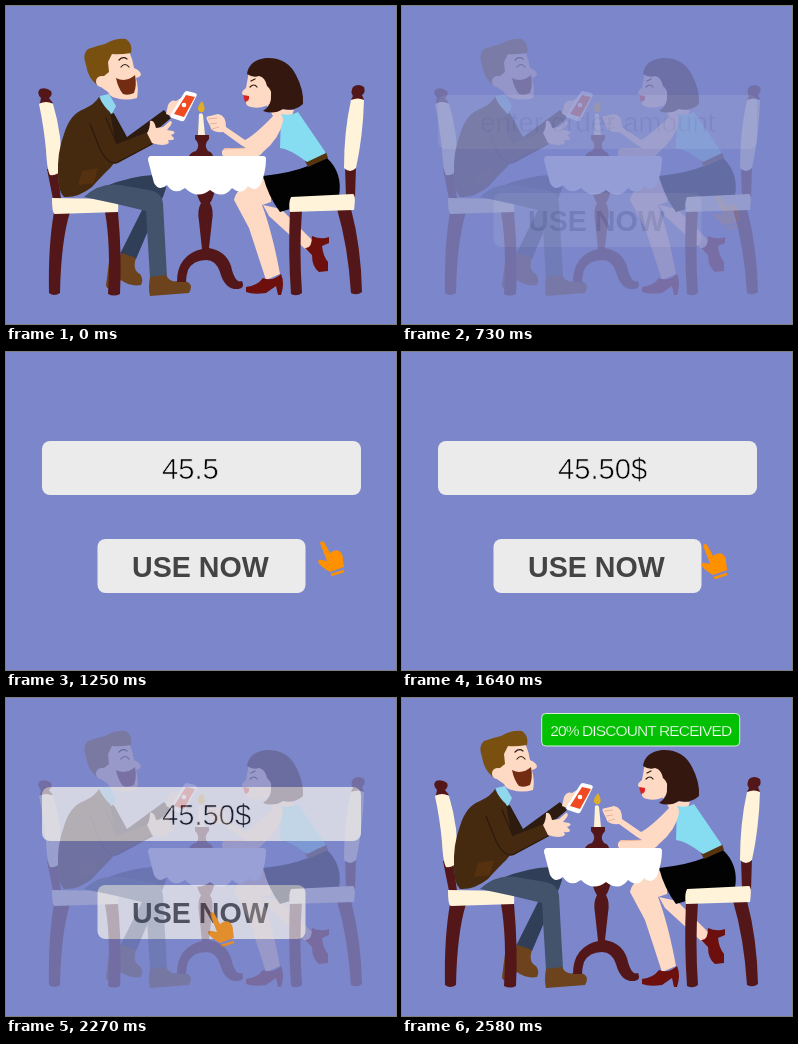
These frames come from a looping animation (390x318 px, 3.38 s). An HTML page:

```html
<!DOCTYPE html>
<html lang="en">
<head>
<meta charset="utf-8">
<title>Dinner discount</title>
<style>
  html, body { margin: 0; height: 100%; overflow: hidden; background: #7b86cb; }
  svg { display: block; }
  text { font-family: "Liberation Sans", Arial, sans-serif; }
  .light { stroke: #ebebeb; stroke-width: .7px; }
  .wood { fill: #531719; }
  .cream { fill: #fff3d9; }
  .skin { fill: #fed9c4; }
  .jacket { fill: #462a10; }
  .dark { fill: #2c1b0e; }
  .shoe { fill: #6c431c; }
  .heel { fill: #6d0f0c; }
  .line { fill: none; stroke: #2c1a0e; stroke-width: 1.2; stroke-linecap: round; }
</style>
</head>
<body>
<svg width="390" height="318" viewBox="0 0 390 318">
  <rect width="390" height="318" fill="#7b86cb"/>

  <g id="form">
    <rect x="36" y="89" width="319" height="54" rx="8" fill="#ebebeb"/>
    <rect x="91.5" y="187" width="208" height="54" rx="8" fill="#ebebeb"/>
    <text id="hint" class="light" x="78" y="126" font-size="27.7" fill="#8c8c8c">enter order amount</text>
    <text id="amount" class="light" x="156" y="126.5" font-size="29.2"></text>
    <text x="126" y="225" font-size="28.6" font-weight="bold" fill="#444">USE NOW</text>
    <circle id="tap" cx="180.500" cy="118" fill="#fff"/>
    <g id="hand" fill="#ff9100">
      <path d="M-2,1Q-1,-2 2,0L8,11Q13,7 17,9Q21,11 21,18L22,25L8,30Q-1,25 -4,20Q-4,17 0,18L5,19Z"/>
      <path d="M9,33L22,29" stroke="#ff9100" stroke-width="2.6"/>
    </g>
  </g>

  <g id="scene">
    <!-- man's far leg and arm -->
    <path fill="#303e58" d="M100,180Q125,170 148,169Q160,171 160,182Q158,190 153,199L130,253L114,248L141,194L105,190Z"/>
    <path class="shoe" d="M116,247L130,252Q126,264 134,268Q138,274 135,279Q124,281 115,274L106,283Q100,283 100,279L103,256Q110,256 116,247Z"/>
    <path class="dark" d="M97,108Q106,102 110,111L121,131L158,104L165,112L127,144Q112,148 106,134Z"/>

    <!-- left chair -->
    <g class="wood">
      <path d="M34,97L35,92Q30,87 34,83Q40,81 45,85Q47,89 43,92L47,97Z"/>
      <path d="M41,163L51,163L55,193L47,193Z"/>
      <path d="M48,206H64Q55,235 54,287Q48,291 43,287Q42,240 48,206Z"/>
      <path d="M99,206H112Q116,250 114,288Q108,291 102,288Q105,240 99,206Z"/>
    </g>
    <path class="cream" d="M33,98Q40,94 47,98Q57,131 55,163Q52,170 44,169Q41,164 40,144Q38,122 33,98Z"/>
    <path class="cream" d="M46,192L110,193Q113,194 112,206L49,208Q46,208 46,192Z"/>

    <!-- phone and hand -->
    <path class="skin" d="M162,99Q165,93 170,95L175,92L182,98L178,108L169,111L160,108Z"/>
    <path d="M181,85L189,87Q192,88 190,91L179,113Q178,116 175,115L166,112Q163,111 165,108L178,87Q179,85 181,85Z" fill="#fff"/>
    <path d="M180,89L189,91L178,111L168,108Z" fill="#f04a23"/>
    <circle cx="178" cy="99" r="2.300" fill="#fff"/>

    <!-- man's body -->
    <path d="M94,90L103,88L110,100L106,108L96,104Z" fill="#90d7ee"/>
    <path class="jacket" d="M93,91Q98,101 104,106L112,150Q108,159 101,165Q92,174 86,181Q72,192 58,191Q52,185 52,170Q51,146 58,128Q64,108 78,103Q89,98 93,91Z"/>
    <path d="M76,165L92,162L88,177L72,179Z" fill="#55310f"/>
    <path fill="#42536b" d="M78,191Q94,176 114,179L143,184Q156,186 157,198L161,271L144,272L140,205Q108,197 78,191Z"/>
    <path class="shoe" d="M144,271L160,269Q164,277 172,275Q183,274 185,280Q185,284 183,287L144,290Q142,282 144,271Z"/>
    <path class="jacket" d="M80,111Q90,99 100,113L111,138L142,126L147,138L112,157Q101,159 94,143Z"/>
    <path class="line" d="M84,118L94,143Q101,158 110,157L146,138M100,112L111,138"/>
    <path class="skin" d="M141,127Q144,123 144,115Q148,113 150,122L157,121L164,115Q167,115 165,119L161,124L167,125Q171,127 165,129L168,132Q168,135 162,134L163,137Q158,141 146,137Z"/>

    <!-- man's head -->
    <path class="skin" d="M99,49L123,45Q127,54 128,62Q135,65 135,69Q133,72 130,72Q133,83 131,92Q120,95 110,92Q104,91 102,86L92,79V55Z"/>
    <path fill="#7a5010" d="M91,79Q82,72 80,59Q76,48 82,43Q90,40 99,38Q109,32 120,33Q127,38 125,47Q113,49 106,48L102,56L103,66L98,70L93,71Z"/>
    <circle class="skin" cx="95.500" cy="75.500" r="5.500"/>
    <path d="M110,72Q120,77 129,69Q131,79 128,87Q122,90 117,88Q112,82 110,72Z" fill="#722c12"/>
    <path class="line" d="M115,61Q119,56 123,61M113,54Q117,50 121,53"/>

    <!-- woman's legs and skirt -->
    <path class="skin" d="M257,199L275,203L308,236L306,248L298,242L263,210Z"/>
    <path class="heel" d="M306,230Q315,234 323,231V237L316,240Q317,250 322,256V265L313,266Q306,261 306,249L299,242Q306,243 306,230Z"/>
    <path class="skin" d="M228,194Q230,183 248,172L265,174V196L256,199Q266,225 274,268L260,274L243,222Z"/>
    <path class="heel" d="M240,281Q251,280 257,272Q266,276 275,268Q279,277 275,289H272L270,280L260,287Q247,289 240,286Z"/>
    <path d="M257,170Q285,167 302,160L321,152Q337,167 333,190L284,193V203L274,206Q262,190 257,170Z" fill="#020203"/>
    <path d="M299,155L320,146L322,152L302,161Z" fill="#55330f"/>

    <!-- woman's body -->
    <path class="skin" d="M260,98L272,103L288,104L283,117L270,115Z"/>
    <path d="M275,108Q285,110 292,106L320,147L301,156Q284,143 274,142Z" fill="#86dcf0"/>
    <path class="skin" d="M268,109Q277,104 277,115Q274,132 257,146Q253,152 246,151L217,150Q214,145 219,142L240,142L235,139L217,126Q205,127 204,120L201,114Q199,110 204,110L212,108Q220,109 220,121L239,134Q249,129 268,109Z"/>
    <path d="M202,113L211,112M204,118L211,117M206,123L213,121M218,143L239,142" fill="none" stroke="#e5a98d" stroke-width=".8"/>

    <!-- woman's head -->
    <path class="skin" d="M243,65L262,66L268,95Q257,104 245,101Q239,100 240,95L237,89Q234,86 240,82Z"/>
    <path d="M241,68Q243,54 260,52Q281,51 290,69Q298,84 297,98Q288,106 277,103Q268,109 257,105Q266,99 265,90Q266,84 261,80Q259,71 253,70Q247,72 241,68Z" fill="#34170f"/>
    <path d="M237,89L243,90Q244,95 239,96Z" fill="#d92222"/>
    <path class="line" d="M244,81Q248,77 251,81M245,75L249,73"/>

    <!-- right chair -->
    <g class="wood">
      <path d="M345,94L347,90Q344,86 347,81Q352,77 358,81Q360,86 356,89L358,94Z"/>
      <path d="M339,160H350L349,191H340Z"/>
      <path d="M284,204H296Q293,245 296,287Q291,291 285,288Q282,245 284,204Z"/>
      <path d="M331,203H345Q355,240 356,286Q351,290 345,287Q342,240 331,203Z"/>
    </g>
    <path class="cream" d="M345,94Q352,91 358,94Q357,130 350,162Q344,168 338,162Q338,125 345,94Z"/>
    <path class="cream" d="M285,191L347,188Q350,189 348,204L284,206Q282,198 285,191Z"/>

    <!-- table and candle -->
    <g class="wood">
      <path d="M190,184H209Q207,193 204,197Q208,204 206,215L203,242Q220,245 225,260Q229,278 236,275Q240,284 228,283Q218,281 214,266Q210,254 200,254Q187,254 182,264Q180,270 180,276H171Q171,249 196,243L193,215Q191,204 195,197Q192,193 190,184Z"/>
      <path d="M183,150Q185,146 190,145Q195,139 189,133V129H203V133Q197,139 202,145Q206,146 207,150Z"/>
    </g>
    <path d="M193,108Q196,106 197,109L199,129H192Z" fill="#fff1d5"/>
    <path d="M196,95Q200,102 198,105Q195,108 192,104Q191,101 196,95Z" fill="#e0ae20"/>
    <path d="M145,150H257Q260,150 260,153Q260,165 255,178Q249,187 242,180Q236,190 226,182Q217,194 204,184Q191,194 179,182Q168,190 161,179Q153,186 148,177L142,154Q142,150 145,150Z" fill="#fff"/>
  </g>

  <g id="banner">
    <rect x="-98.500" y="-16.500" width="198" height="32.500" rx="4" fill="#02c002" stroke="#d5efd5"/>
    <text x="-90" y="5.500" font-size="15.5" letter-spacing="-.88" fill="#fff" stroke="#02c002" stroke-width=".25">20% DISCOUNT RECEIVED</text>
  </g>
</svg>
<script>
const LOOP = 3380;
const TYPED = [[1160, "4"], [1190, "45"], [1250, "45.5"], [1280, "45.50"], [1310, "45.50$"]];
const el = id => document.getElementById(id);
const [form, hint, amount, tap, hand, scene, banner] =
  ["form", "hint", "amount", "tap", "hand", "scene", "banner"].map(el);

const ramp = (t, from, to) => Math.min(1, Math.max(0, (t - from) / (to - from)));
const easeOut = x => 1 - (1 - x) ** 1.5;
const mix = (a, b, x) => a.map((v, i) => v + (b[i] - v) * x);

const START = [316, 190], FIELD = [181, 117], BUTTON = [206, 215];

function handPosition(t) {
  if (t < 1000) return mix(START, FIELD, easeOut(ramp(t, 760, 910)));
  if (t < 1610) return mix(FIELD, START, easeOut(ramp(t, 1000, 1190)));
  return mix(START, BUTTON, easeOut(ramp(t, 1610, 2000)));
}

function draw(t) {
  const back = t < 2270 ? 0 : ramp(t, 2240, 2380);
  scene.setAttribute("opacity", t < 670 ? 1 : t < 2270 ? 1 - ramp(t, 634, 754) : back);
  form.setAttribute("opacity", t < 2270 ? ramp(t, 720, 820) : 1 - back);

  hint.setAttribute("opacity", 1 - ramp(t, 1040, 1130));
  amount.textContent = TYPED.reduce((shown, [at, text]) => t >= at ? text : shown, "");
  tap.setAttribute("r", 12 * ramp(t, 880, 940));
  tap.setAttribute("opacity", 1 - ramp(t, 970, 1060));
  hand.setAttribute("transform", `translate(${handPosition(t)})`);

  const grow = ramp(t, 2391, 2580);
  banner.setAttribute("transform", `translate(238.2 32) scale(${grow})`);
  banner.setAttribute("visibility", grow ? "visible" : "hidden");
}

const begin = performance.now();
function tick() {
  draw((performance.now() - begin) % LOOP);
  requestAnimationFrame(tick);
}
tick();
</script>
</body>
</html>
```
